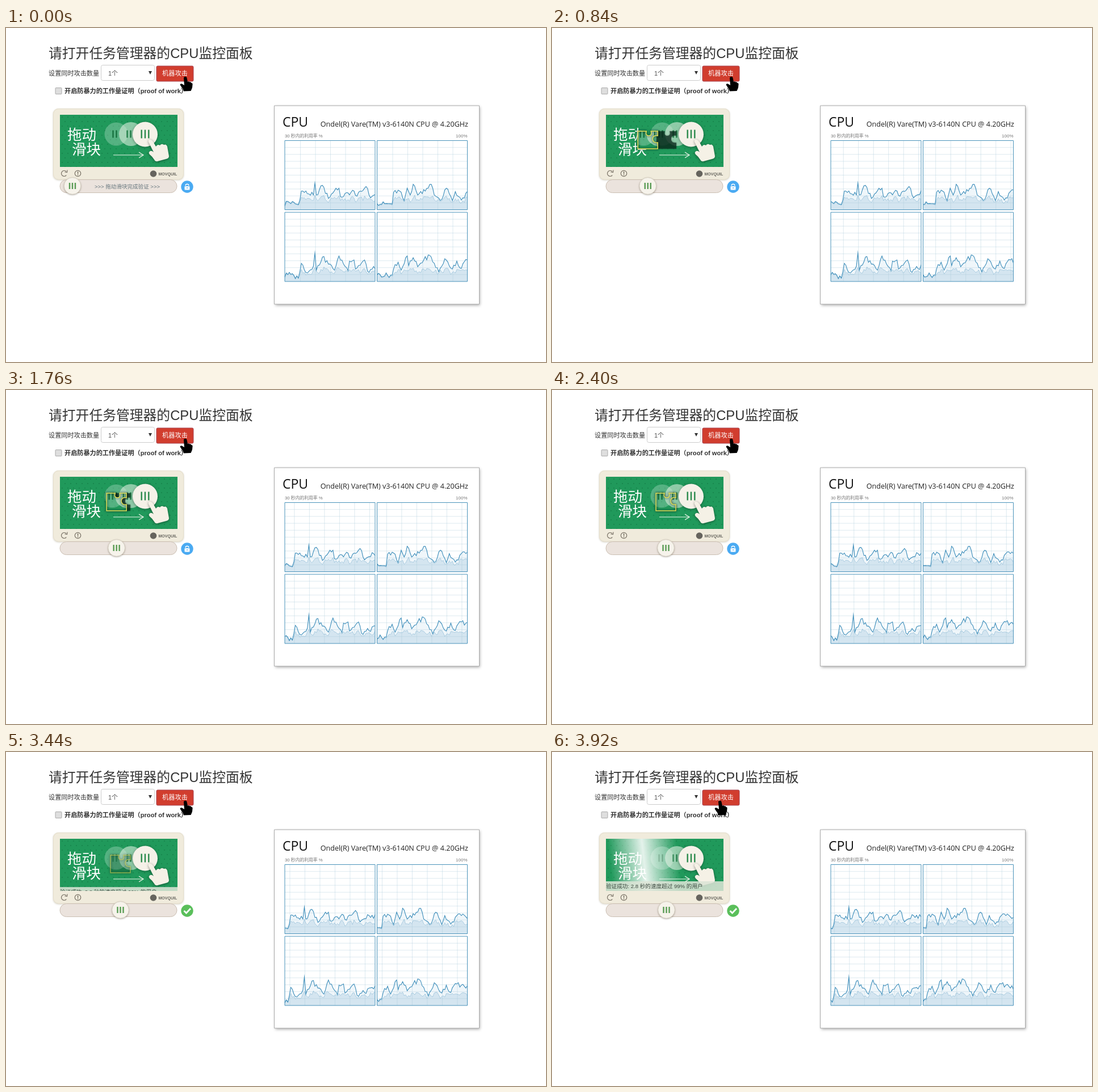
An HTML page with a canvas that plays this animation: 951 by 589 pixels, repeating every 3960 ms.

```html
<!DOCTYPE html>
<html lang="zh">
<head>
<meta charset="utf-8">
<style>
  html, body { margin: 0; width: 100%; height: 100%; overflow: hidden; background: #fff; }
  canvas { display: block; }
</style>
</head>
<body>
<canvas id="stage" width="951" height="589"></canvas>
<script>
const LOOP = 3960, TICK = 40;
const ctx = document.getElementById('stage').getContext('2d');
const SANS = '"Liberation Sans", "Noto Sans CJK SC", sans-serif';
const UI = '"Open Sans", "Noto Sans CJK SC", sans-serif';
const TARGET = 201.5;

const clamp = v => Math.max(0, Math.min(1, v));
const progress = (t, from, to) => clamp((t - from) / (to - from));

function text(str, x, y, size, color, { align = 'left', weight = 400, family = SANS } = {}) {
  ctx.font = `${weight} ${size}px ${family}`;
  ctx.textAlign = align;
  ctx.fillStyle = color;
  ctx.fillText(str, x, y);
}

function box(x, y, w, h, r, fill, stroke) {
  ctx.beginPath();
  ctx.roundRect(x, y, w, h, r);
  if (fill) { ctx.fillStyle = fill; ctx.fill(); }
  if (stroke) { ctx.lineWidth = 1; ctx.strokeStyle = stroke; ctx.stroke(); }
}

function disc(x, y, r, fill) {
  ctx.beginPath();
  ctx.arc(x, y, r, 0, Math.PI * 2);
  ctx.fillStyle = fill;
  ctx.fill();
}

function line(points, color, width = 1) {
  ctx.beginPath();
  points.forEach(([x, y]) => ctx.lineTo(x, y));
  ctx.strokeStyle = color;
  ctx.lineWidth = width;
  ctx.stroke();
}

function shape(path, fill, x = 0, y = 0) {
  layer(() => {
    ctx.translate(x, y);
    ctx.fillStyle = fill;
    ctx.fill(path);
  });
}

function layer(draw, alpha = 1) {
  ctx.save();
  ctx.globalAlpha *= alpha;
  draw();
  ctx.restore();
}

function shadow(color, blur, dx = 0, dy = 0) {
  ctx.shadowColor = color;
  ctx.shadowBlur = blur;
  ctx.shadowOffsetX = dx;
  ctx.shadowOffsetY = dy;
}

function bars(x, y, h, gap, color, count = 3) {
  ctx.fillStyle = color;
  for (let i = 0; i < count; i++) ctx.fillRect(x + (i - (count - 1) / 2) * gap - 1.2, y - h / 2, 2.4, h);
}

// ---- CPU charts ----
const CHART_W = 159, CHART_H = 122, SAMPLES = 60, STEP = CHART_W / SAMPLES;

const noise = (i, seed) => {
  const v = Math.sin(i * 12.9898 + seed * 78.233) * 43758.5453;
  return (v - Math.floor(v)) * 2 - 1;
};

// Load heights in pixels: [sample, height] landmarks with small jitter between them.
function chart(left, top, seed, marks) {
  const upper = [], lower = [];
  for (let i = 0, k = 0; i <= SAMPLES + 9; i++) {
    while (k < marks.length - 2 && i > marks[k + 1][0]) k++;
    const [a, ha] = marks[k], [b, hb] = marks[k + 1];
    const exact = i === a || i === b;
    const h = ha + (hb - ha) * (i - a) / (b - a) + (exact ? 0 : noise(i, seed) * 4);
    upper.push(h);
    lower.push(i < 10 ? h - 1 : Math.min(h - 2, 17 + (h - 25) * .3 + noise(i, seed + 9) * 4));
  }
  return { left, top, upper, lower };
}

const charts = [
  chart(491, 198.5, 1, [[0, 7], [1, 15], [9, 9], [11, 33], [19, 26], [20, 47], [21, 26], [25, 43],
    [29, 20], [34, 38], [36, 38], [37, 23], [46, 33], [48, 24], [54, 41], [57, 21], [63, 32], [69, 29]]),
  chart(653.5, 198.5, 2, [[0, 11], [10, 10], [11, 31], [15, 33], [18, 16], [20, 38], [22, 26], [24, 45],
    [27, 26], [36, 45], [38, 26], [43, 18], [46, 38], [50, 16], [52, 32], [56, 17], [62, 35], [69, 26]]),
  chart(491, 325, 3, [[0, 8], [1, 15], [9, 6], [11, 32], [15, 15], [19, 27], [20, 50], [21, 20],
    [25, 43], [33, 20], [36, 45], [42, 19], [43, 36], [46, 38], [47, 22], [53, 38], [55, 18], [69, 34]]),
  chart(653.5, 325, 4, [[0, 12], [10, 11], [12, 30], [14, 34], [16, 20], [20, 45], [21, 28], [24, 42],
    [27, 26], [31, 38], [35, 46], [41, 17], [45, 40], [50, 22], [53, 36], [55, 24], [60, 38], [69, 30]]),
];

function drawChart({ left, top, upper, lower }, shift) {
  const base = top + CHART_H, right = left + CHART_W;
  const trace = data => data.map((h, i) => [left + (i - shift) * STEP, base - h]);
  const area = (points, fill) => {
    ctx.beginPath();
    ctx.moveTo(points[0][0], base);
    points.forEach(p => ctx.lineTo(...p));
    ctx.lineTo(points[points.length - 1][0], base);
    ctx.fillStyle = fill;
    ctx.fill();
  };
  layer(() => {
    ctx.beginPath();
    ctx.rect(left, top, CHART_W, CHART_H);
    ctx.clip();
    const load = trace(upper), kernel = trace(lower);
    area(load, '#eff6fa');
    area(kernel, '#d4e5f0');
    const first = left + 27.5 - shift * STEP;
    for (let x = first; x < right; x += STEP * 10) line([[x, top], [x, base]], 'rgba(165,200,215,.38)');
    for (let i = 1; i < 10; i++) {
      const y = top + i * CHART_H / 10;
      line([[left, y], [right, y]], 'rgba(165,200,215,.38)');
    }
    ctx.setLineDash([1.5, 1]);
    line(kernel, '#7fb2d0', .9);
    ctx.setLineDash([]);
    line(load, '#3c8dba', 1.1);
  });
  box(left, top, CHART_W, CHART_H, 0, null, '#4b93ba');
}

function drawMonitor(t) {
  layer(() => {
    shadow('rgba(0,0,0,.35)', 5, 1, 2);
    box(472.5, 137, 361, 350, 0, '#fff');
  });
  box(472.5, 137, 361, 350, 0, null, '#aaa');
  text('CPU', 487, 174, 23, '#111', { family: UI });
  text('Ondel(R) Vare(TM) v3-6140N CPU @ 4.20GHz', 814, 174, 12.6, '#222', { align: 'right', family: UI });
  text('30 秒内的利用率 %', 491, 192.5, 7.8, '#777');
  text('100%', 812.5, 192.5, 8, '#777', { align: 'right' });
  const shift = Math.max(0, Math.floor((t - 240) / 500) + 1);
  charts.forEach(c => drawChart(c, shift));
}

// ---- Page controls ----
const cursor = new Path2D(`M-1 0 Q2 -1 2.5 2 L4 9 Q6 7.5 7.5 9.5 Q10 8.5 10.5 11 Q13 11 12.5 14
  L12 19 Q11 22 9.5 25 L-3 25.5 Q-4 21 -7 18 L-9.5 14 Q-9 11.5 -6 12.5 L-2 15 L-3 2 Q-3 0 -1 0 Z`);

function drawControls() {
  text('请打开任务管理器的CPU监控面板', 75, 53, 23.8, '#333');
  text('设置同时攻击数量', 75, 83.5, 11.15, '#333');
  box(167.5, 65.5, 94, 27, 3, '#fff', '#ccc');
  text('1个', 180, 83.5, 11, '#555');
  ctx.fillStyle = '#333';
  ctx.fill(new Path2D('M251 76 h6 l-3 6 z'));
  box(265, 67, 65, 27, 2, '#d13d2e', '#a94552');
  text('机器攻击', 297.5, 84, 11.2, '#fff', { align: 'center' });
  box(87, 105.5, 11, 11, 1, '#dedede', '#aaa');
  text('开启防暴力的工作量证明（proof of work）', 103, 115, 11.15, '#333', { weight: 700 });
}

// ---- Slider puzzle ----
const hand = new Path2D(`M251 201 Q250 196 255 197 Q258 198 260 202 L264 209 Q267 204 271 207
  Q274 203 278 206 Q282 204 284 209 L287 226 Q287 230 282 231 L267 235 Q263 236 261 232
  Q257 226 253 223 Q250 219 254 217 Q257 216 260 219 Z`);
const piece = new Path2D(`M184 182 H199 C197 188 200 190 203 190 C207 190 209 187 207 182 H219 V190
  C212 189 210 192 210 196 C210 200 213 203 219 202 V213 H184 Z`);

function drawPicture() {
  ctx.fillStyle = '#20995b';
  ctx.fillRect(95, 153, 207, 92);
  ctx.fillStyle = 'rgba(0,75,40,.22)';
  for (let row = 0; row < 12; row++)
    for (let x = 98 + row % 2 * 5; x < 302; x += 10) ctx.fillRect(x, 156 + row * 8, 2, 2);
  const title = { weight: 500, family: '"Noto Sans CJK SC", sans-serif' };
  text('拖动', 108, 197, 25.5, '#fff', title);
  text('滑块', 116, 223, 25.5, '#fff', title);
  disc(194, 187, 20.5, 'rgba(255,255,255,.24)');
  bars(191.5, 187, 13, 6, '#17713f', 2);
  disc(220, 187, 21, 'rgba(225,240,225,.58)');
  bars(216.5, 187, 13, 6, '#217e48', 2);
  layer(() => {
    shadow('rgba(0,0,0,.35)', 5, 0, 1);
    disc(245, 187.5, 22, '#f5f1e8');
  });
  bars(245, 187, 15, 6.3, '#2b8a4c');
  line([[189, 224], [242, 224]], '#e6f3e6', 1.1);
  line([[234, 219], [242, 224], [234, 229]], '#f2f8ee', 1.2);
  layer(() => {
    shadow('rgba(0,0,0,.45)', 4, 0, 1);
    shape(hand, '#f5f1e6');
  });
}

function drawPuzzle(knob) {
  layer(() => {
    shadow('rgba(0,0,0,.6)', 3);
    shape(piece, 'rgba(10,45,30,.68)');
  });
  ctx.translate(knob - TARGET, 0);
  layer(() => {
    ctx.clip(piece);
    drawPicture();
  });
  shadow('rgba(0,0,0,.85)', 4);
  ctx.lineWidth = 1.5;
  ctx.strokeStyle = '#e0df58';
  ctx.stroke(piece);
}

function drawSheen(t) {
  const x = 295 - (t - 3680) * .55;
  const glow = ctx.createLinearGradient(x - 60, 206, x + 60, 192);
  [0, .5, 1, .5, 0].forEach((a, i) => glow.addColorStop(i / 4, `rgba(255,255,255,${a * .88})`));
  ctx.fillStyle = glow;
  ctx.fillRect(95, 153, 207, 92);
}

function drawStatus(t) {
  const x = 319, y = 280;
  const [state, color] = t < 2840 ? ['lock', '#4aaaf2'] : t < 3400 ? ['wait', '#f8c541'] : ['done', '#5abf5b'];
  disc(x, y, 10.7, color);
  if (state === 'lock') {
    box(x - 4.5, y - 1, 9, 6.5, 1, '#fff');
    ctx.beginPath();
    ctx.arc(x, y - 2, 2.8, Math.PI, 0);
    ctx.strokeStyle = '#fff';
    ctx.lineWidth = 1.6;
    ctx.stroke();
    disc(x, y + 2, 1, color);
  } else if (state === 'wait') {
    box(x - 6.5, y - 1.5, 13, 3, 1, '#fff');
  } else {
    line([[x - 5.5, y], [x - 1.5, y + 4], [x + 6, y - 4]], '#fff', 2.8);
  }
}

function drawIcons() {
  ctx.strokeStyle = '#777064';
  ctx.lineWidth = 1.2;
  ctx.beginPath();
  ctx.arc(102.5, 256.5, 5, .7, 5.5);
  ctx.moveTo(108, 250.5);
  ctx.lineTo(107.5, 254.5);
  ctx.lineTo(103.5, 254);
  ctx.stroke();
  ctx.beginPath();
  ctx.arc(126.5, 256.5, 5.2, 0, Math.PI * 2);
  ctx.stroke();
  ctx.fillStyle = '#777064';
  ctx.fillRect(125.8, 253, 1.5, 4.3);
  ctx.fillRect(125.8, 258.3, 1.5, 1.5);
  disc(259.5, 257, 5.8, '#66645e');
  text('MOVQUIL', 268.5, 260, 7, '#66645e', { weight: 700 });
}

function drawWidget(t) {
  const knob = TARGET - 84.5 * (1 - progress(t, 0, 3100)) ** 3;
  layer(() => {
    shadow('rgba(110,95,60,.3)', 3, 0, 1);
    box(83, 142, 230, 125.5, 9, '#f0ebdc');
  });
  box(83.5, 142.5, 229, 124.5, 9, null, '#e5decb');

  layer(() => {
    ctx.beginPath();
    ctx.rect(95, 153, 207, 92);
    ctx.clip();
    drawPicture();
    const puzzle = t < 3400 ? progress(t, 0, 400) : 1 - progress(t, 3360, 3560);
    if (puzzle > 0) layer(() => drawPuzzle(knob), puzzle);
    if (t >= 3400) {
      drawSheen(t);
      const y = 245 - 17 * progress(t, 3360, 3560);
      ctx.fillStyle = 'rgba(220,229,215,.86)';
      ctx.fillRect(95, y, 207, 18);
      text('验证成功: 2.8 秒的速度超过 99% 的用户', 95, y + 12, 9.6, '#3c4a40');
    }
  });
  drawIcons();

  box(95, 267.5, 206, 23, 11.5, '#ebe3dd', '#cbbfb3');
  layer(() => text('>>> 拖动滑块完成验证 >>>', 213.5, 282.5, 9.55, '#67777e', { align: 'center' }),
    1 - progress(t, 0, 620));
  layer(() => {
    shadow('rgba(80,70,50,.5)', 3, 0, 1);
    disc(knob, 278.5, 14.8, '#f6f3eb');
  });
  ctx.strokeStyle = '#d0c8ba';
  ctx.lineWidth = .8;
  ctx.stroke();
  bars(knob, 278.5, 11, 5, '#5a9c55');
  drawStatus(t);
}

function draw(t) {
  ctx.fillStyle = '#fff';
  ctx.fillRect(0, 0, 951, 589);
  drawControls();
  drawWidget(t);
  drawMonitor(t);
  shape(cursor, '#000', 316 - 20 * progress(t, 3700, 3920), 86);
}

const start = performance.now();
function frame() {
  const t = (performance.now() - start) % LOOP;
  draw(Math.floor(t / TICK) * TICK);
  requestAnimationFrame(frame);
}
frame();
</script>
</body>
</html>
```
